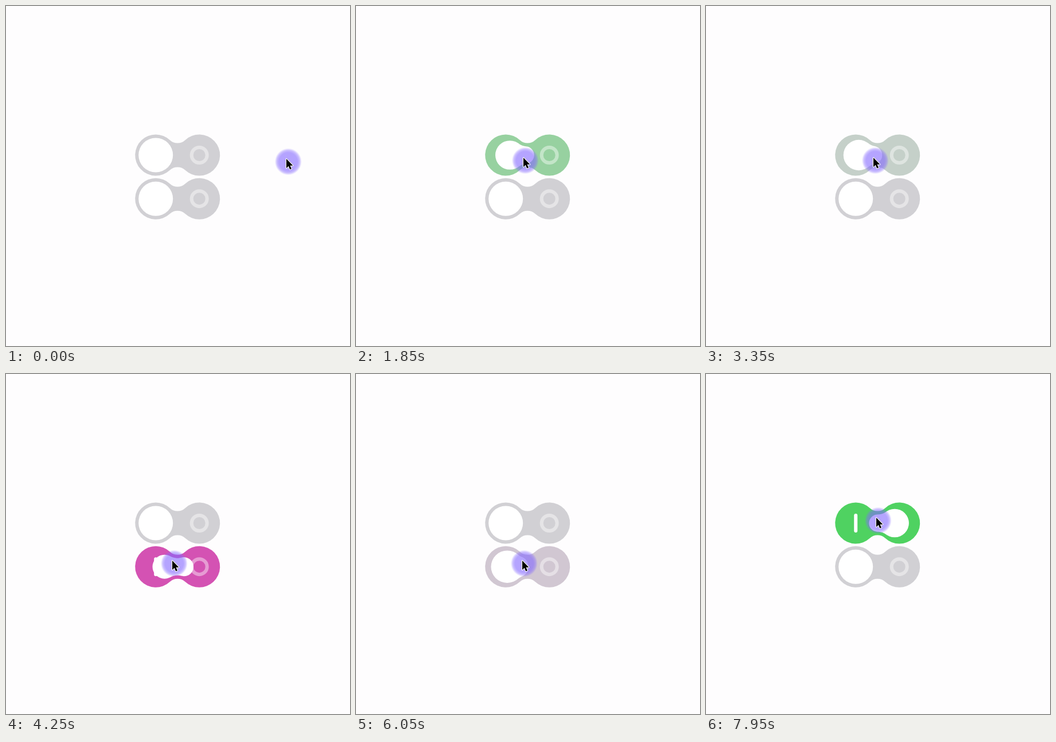
An HTML page with a canvas that plays this animation: 600x594 px, repeating every 8000 ms.

```html
<!DOCTYPE html>
<html lang="en">
<head>
<meta charset="utf-8">
<title>Gooey toggles</title>
<style>
  html, body { margin: 0; height: 100%; overflow: hidden; background: #fefdfe; }
  canvas { display: block; }
</style>
</head>
<body>
<canvas width="600" height="594"></canvas>
<script>
const ctx = document.querySelector('canvas').getContext('2d');
const LOOP = 8000;
const LEFT = 261.2, GAP = 76, MID = LEFT + GAP / 2, RIGHT = LEFT + GAP;
const R = 36, FILLET = 19.6, FILLET_Y = 40.6, INSET = 6;
const GREY = [209, 208, 212];

const toggles = [
  { y: 260.5, color: [60, 210, 80], clicks: [[1770, 1], [2980, 0], [7720, 1]] },
  { y: 336.7, color: [214, 0, 158], clicks: [[4120, 1], [5630, 0]] }
];

// Cursor tip: time, x, y
const path = [
  [0, 489, 267], [650, 489, 267], [880, 395, 282], [1100, 303, 271], [1300, 292, 265],
  [3400, 292, 265], [3800, 291, 320], [4000, 290, 326],
  [7300, 290, 326], [7350, 293, 297], [7550, 297, 251], [LOOP, 297, 251]
];

const lerp = (a, b, p) => a + (b - a) * p;
const clamp = p => Math.min(1, Math.max(0, p));
const easeOut = p => 1 - (1 - clamp(p)) ** 2.8;
const smooth = p => p * p * (3 - 2 * p);
const lag = p => 0.3 * p + 0.7 * smooth(p ** 1.2);

// Monotone cubic through the path points
function along(t, axis) {
  const slope = i => path[i] && path[i + 1]
    ? (path[i + 1][axis] - path[i][axis]) / (path[i + 1][0] - path[i][0]) : 0;
  const tangent = i => {
    const a = slope(i - 1), b = slope(i);
    return a * b > 0 ? 2 * a * b / (a + b) : 0;
  };
  let i = 0;
  while (i < path.length - 2 && path[i + 1][0] <= t) i++;
  const span = path[i + 1][0] - path[i][0];
  const p = (t - path[i][0]) / span, q = 1 - p;
  return lerp(path[i][axis], path[i + 1][axis], smooth(p))
    + span * p * q * (q * tangent(i) - p * tangent(i + 1));
}

function circle(x, y, r) {
  ctx.beginPath();
  ctx.arc(x, y, r, 0, 7);
}

function track(y) {
  const a = Math.atan2(FILLET_Y, GAP / 2), PI = Math.PI;
  ctx.beginPath();
  ctx.arc(LEFT, y, R, a, -a);
  ctx.arc(MID, y - FILLET_Y, FILLET, PI - a, a, true);
  ctx.arc(RIGHT, y, R, a - PI, PI - a);
  ctx.arc(MID, y + FILLET_Y, FILLET, -a, a - PI, true);
  ctx.fill();
}

// The thumb is swept along the axis, always filling the inset track
function thumb(from, to, y) {
  const n = Math.ceil(Math.abs(to - from) * 2) || 1;
  ctx.beginPath();
  for (let i = 0; i <= n; i++) {
    const x = lerp(from, to, i / n);
    const r = Math.hypot(MID - x, FILLET_Y) - FILLET - INSET;
    ctx.moveTo(x + r, y);
    ctx.arc(x, y, r, 0, 2 * Math.PI);
  }
  ctx.fill();
}

function toggle({ y, color, clicks }, t) {
  const [start, on] = clicks.filter(c => c[0] <= t).pop() || [-LOOP, 0];
  const p = clamp((t - start) / (on ? 420 : 600));
  const [begin, end] = on ? [LEFT, RIGHT] : [RIGHT, LEFT];
  const tint = easeOut(p < 1 ? p - 0.03 : 1);
  const mix = GREY.map((g, i) => lerp(g, color[i], on ? tint : 1 - tint));

  ctx.fillStyle = `rgb(${mix})`;
  track(y);

  ctx.lineWidth = 6;
  ctx.strokeStyle = 'rgba(255,255,255,.42)';
  circle(RIGHT, y, 13.5);
  ctx.stroke();

  ctx.lineCap = 'round';
  ctx.strokeStyle = ctx.fillStyle = '#fff';
  ctx.beginPath();
  ctx.moveTo(LEFT, y - 13.5);
  ctx.lineTo(LEFT, y + 13.5);
  ctx.stroke();

  thumb(lerp(begin, end, lag(p)), lerp(begin, end, easeOut(p)), y);
}

const arrow = new Path2D('M0 0V16.2L3.7 12.8L6.2 18.6L9 17.4L6.5 11.7H11.4Z');

function cursor(x, y) {
  const gx = x + 3.3, gy = y + 5;
  const glow = ctx.createRadialGradient(gx, gy, 16, gx, gy, 23.5);
  glow.addColorStop(0, 'rgba(131,103,255,.6)');
  glow.addColorStop(0.5, 'rgba(131,103,255,.42)');
  glow.addColorStop(1, 'rgba(131,103,255,0)');
  ctx.fillStyle = glow;
  circle(gx, gy, 23.5);
  ctx.fill();

  ctx.save();
  ctx.translate(x, y);
  ctx.lineWidth = 2;
  ctx.lineJoin = 'round';
  ctx.strokeStyle = '#fff';
  ctx.stroke(arrow);
  ctx.fillStyle = '#000';
  ctx.fill(arrow);
  ctx.restore();
}

function draw() {
  const t = performance.now() % LOOP;
  ctx.fillStyle = '#fefdfe';
  ctx.fillRect(0, 0, 600, 594);
  toggles.forEach(item => toggle(item, t));
  cursor(along(t, 1), along(t, 2));
  requestAnimationFrame(draw);
}
draw();
</script>
</body>
</html>
```
